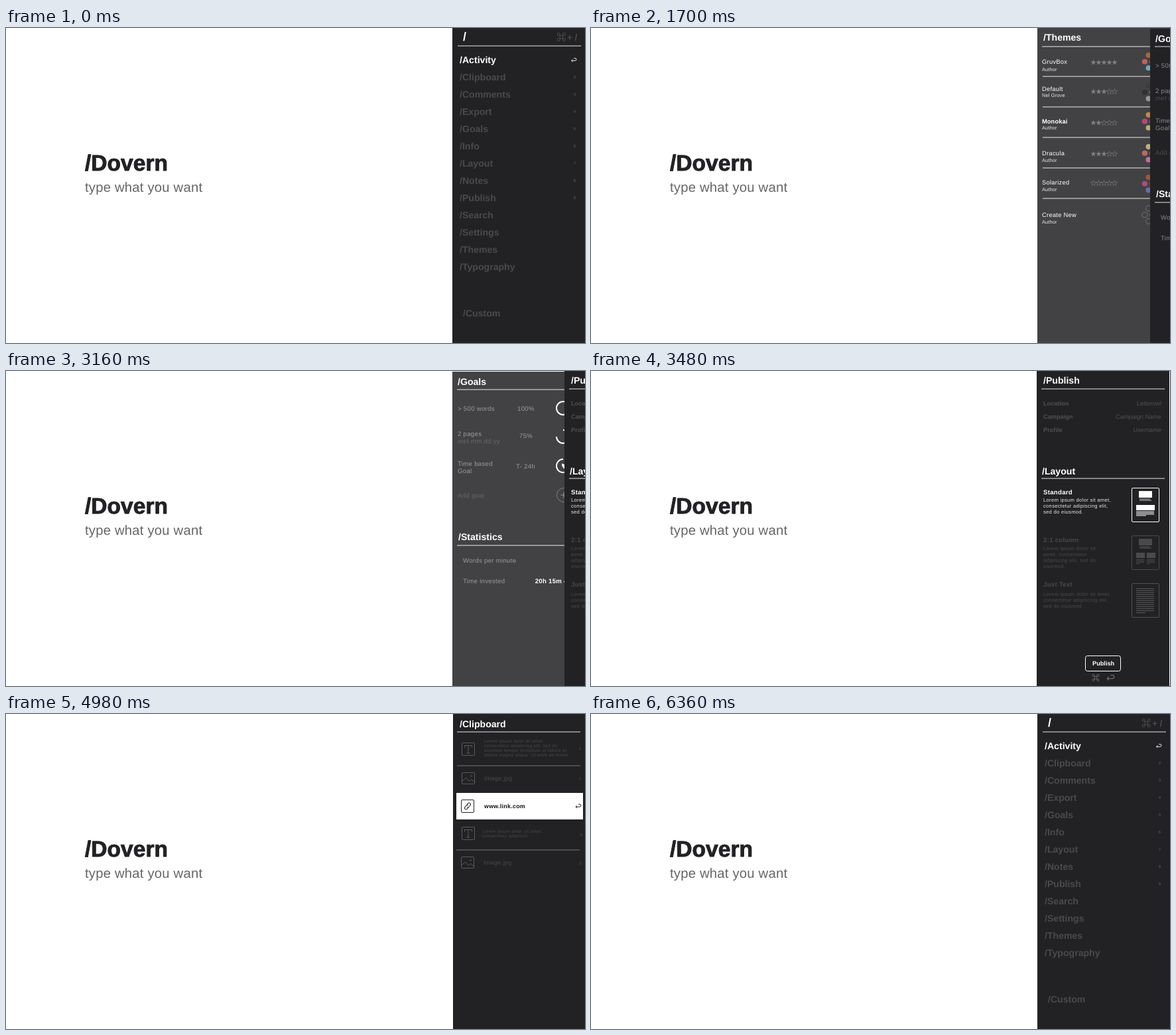
An HTML page for the animation above (6.86 s loop, 873 px wide and 475 px high).

```html
<!DOCTYPE html>
<html lang="en">
<head>
<meta charset="utf-8">
<title>Command panel</title>
<style>
html, body { margin: 0; width: 100%; height: 100%; overflow: hidden; background: #fff; }
svg { display: block; width: 873px; height: 475px; }
text {
  font-family: "Liberation Sans", Arial, Helvetica, sans-serif;
  white-space: pre;
  text-rendering: geometricPrecision;
}
</style>
</head>
<body>
<svg id="stage" viewBox="0 0 873 475" xmlns="http://www.w3.org/2000/svg"></svg>
<script>
const BG = '#222224', DIM = '#4a4a4c', MID = '#8a8a8c', RULE = '#a6a6a8', WHITE = '#fff';

// Markup helpers
const text = (x, y, s, size, fill, o = {}) =>
  `<text x="${x}" y="${y}" font-size="${size}" fill="${fill}" font-weight="${o.bold ? 700 : 400}"` +
  ` letter-spacing="${o.gap || 0}" text-anchor="${o.end ? 'end' : 'start'}">${s.replace('>', '&gt;')}</text>`;
const bold = (x, y, s, size, fill, o) => text(x, y, s, size, fill, { bold: true, ...o });
const head = (x, y, s, fill = WHITE) => bold(x, y, s, 14.1, fill);
const lines = (x, ys, rows, size, fill, gap) =>
  rows.map((s, i) => text(x, ys[i], s, size, fill, { gap })).join('');
const rect = (x, y, w, h, fill) => `<rect x="${x}" y="${y}" width="${w}" height="${h}" fill="${fill}"/>`;
const frame = (x, y, w, h, r, color) =>
  `<rect x="${x}" y="${y}" width="${w}" height="${h}" rx="${r}" fill="none" stroke="${color}"/>`;
const path = (d, color, w = 1, at = '') =>
  `<path d="${d}" fill="none" stroke="${color}" stroke-width="${w}" stroke-linejoin="round" transform="${at}"/>`;
const rule = (x, y, color = RULE, w = 1.7) => path(`M${x} ${y}h186`, color, w);
const back = (x, y = 0) => rect(x, y, 200, 475 - y, BG);

// Icons
const returnKey = (x, y, color, k = 1) =>
  path('M-4 1H2A2 2 0 0 0 2 -3H0M-2 -1L-4 1L-2 3', color, 1, `translate(${x} ${y}) scale(${k})`);
function commandKey(x, y, color, k) {
  const loop = [0, 90, 180, 270].map(a =>
    path('M-2 -2H-3.7A1.7 1.7 0 1 1 -2 -3.7Z', color, 1, `rotate(${a})`)).join('');
  return `<g transform="translate(${x} ${y}) scale(${k})">${path('M-2 -2H2V2H-2Z', color)}${loop}</g>`;
}
function star(x, y, full) {
  const pts = Array.from({ length: 10 }, (_, i) => {
    const r = i % 2 ? 1.7 : 4.4, a = i * Math.PI / 5;
    return `${(x + r * Math.sin(a)).toFixed(2)},${(y - r * Math.cos(a)).toFixed(2)}`;
  });
  return `<polygon points="${pts.join(' ')}" fill="${full ? '#6c6c6e' : 'none'}" stroke="#6c6c6e" stroke-width="${full ? 0 : .6}"/>`;
}
const stars = (y, n) => [0, 1, 2, 3, 4].map(i => star(757.5 + 8 * i, y, i < n)).join('');
const HEX = [[-6, -9.7], [5.6, -9.7], [-11.8, 0], [0, 0], [11.6, 0], [-6, 9.6], [5.6, 9.6]];
const dots = (y, colors) => HEX.map(([dx, dy], i) =>
  `<ellipse cx="${846.7 + dx}" cy="${y + dy}" rx="4.2" ry="4" ` +
  (colors ? `fill="${colors[i]}"/>` : 'fill="none" stroke="#59595b"/>')).join('');
const textIcon = (x, y) => frame(x, y, 19, 19, 1.5, '#5a5a5c') +
  path('M4 7V4H15V7M9.5 4V15.5M7 15.5H12', '#5a5a5c', 1, `translate(${x} ${y})`);
const imageIcon = (x, y) => frame(x, y, 19, 17, 1.5, '#5a5a5c') +
  path('M0 13L6 7.5L11 13L14 10L19 14M13 5a1 1 0 1 0 2 0a1 1 0 1 0 -2 0', '#5a5a5c', 1, `translate(${x} ${y})`);
const pin = (x, y) => path('M-4 -3L3 4M-1 -3L4 1M-2 2L2 -1', '#3c3c3e', 1, `translate(${x} ${y})`);

function menu() {
  const items = ['Activity', 'Clipboard', 'Comments', 'Export', 'Goals', 'Info', 'Layout',
    'Notes', 'Publish', 'Search', 'Settings', 'Themes', 'Typography'];
  return back(673) + bold(689, 19, '/', 18, WHITE) + commandKey(837.3, 13.5, DIM, 1.1) +
    bold(846, 19, '+', 14, DIM) + bold(857.5, 18.5, '/', 14, DIM) + rule(681, 27) +
    items.map((s, i) => head(684, 53 + 26 * i, '/' + s, i ? DIM : WHITE) +
      (i > 0 && i < 9 ? text(859, 76 + 26 * (i - 1), String(i + 1), 6, '#626264', { end: true }) : '')).join('') +
    returnKey(856.3, 48.3, WHITE, .92) + head(689, 435, '/Custom', DIM);
}

function themes() {
  const rows = [
    ['GruvBox', 54, 64.5, 52, 5, 50.7, '#93501f #a87b28 #b8443e #b5b0a6 #6d9a3c #5a98ad #1f70a5'],
    ['Default', 95, 104, 96, 3, 97, '#1b1b1d #38383a #0e0e0f #bababa #606062 #848486 #606062'],
    ['Monokai', 144, 153, 143, 2, 140.8, '#b8702c #8a63b5 #a82c58 #b5b5b0 #55a0b0 #a8a05a #7ea030'],
    ['Dracula', 192, 202, 190, 3, 188.8, '#a8a868 #58a0b0 #b05048 #b5b5b5 #40a860 #b85890 #55597a'],
    ['Solarized', 236, 245.5, 234, 0, 234.8, '#8c3a24 #7d5d18 #a02c62 #50707a #6d9a30 #4e5690 #2a7a7a'],
    ['Create New', 285, 294.5, 0, -1, 281.7, '']
  ];
  return back(673) + head(682, 19, '/Themes') + rule(680, 28) +
    [73, 119, 165, 211, 257].map(y => rule(681, y)).join('') +
    rows.map(([name, y, y2, sy, n, dy, colors], i) =>
      text(680, y, name, 9.3, WHITE, { gap: i === 2 ? .1 : .3, bold: i === 2 }) +
      text(680, y2, i === 1 ? 'Nel Grove' : 'Author', 7.5, '#e4e4e4', { gap: .1 }) +
      (n < 0 ? '' : stars(sy, n)) + dots(dy, colors && colors.split(' '))).join('');
}

function goals() {
  const t = (x, y, s, fill = MID) => text(x, y, s, 9.6, fill, { gap: .3 });
  const value = (y, s) => bold(858, y, s, 9.6, WHITE, { gap: .3, end: true });
  return back(673, 1) + head(681, 21, '/Goals') + rule(680, 28) +
    t(681, 60, '> 500 words') + t(771, 60, '100%') +
    t(681, 98, '2 pages') + t(681, 109, 'met mm.dd.yy', '#4c4c4e') + t(774, 101, '75%') +
    t(681, 143, 'Time based') + t(681, 154, 'Goal') + t(769, 147, 'T- 24h') +
    t(681, 191, 'Add goal', '#4c4c4e') +
    `<circle cx="840" cy="56" r="10" fill="none" stroke="#fff" stroke-width="2"/>` +
    path('M840 89A10 10 0 1 1 830 99', WHITE, 2) +
    path('M840 133A10 10 0 1 0 847 150.2', WHITE, 2) +
    `<path d="M838 139.5Q845 141 844.5 146.5Q842.5 148.5 840 146Q837.5 143 838 139.5Z" fill="#fff"/>` +
    `<circle cx="841" cy="187" r="10.5" fill="none" stroke="#6a6a6c"/>` +
    path('M836.5 187h9M841 182.5v9', '#8a8a8c') +
    pin(864, 57) + pin(863, 99) + pin(863, 139) +
    head(682, 255, '/Statistics') + rule(680, 263) +
    t(689, 289, 'Words per minute') + value(289, '80') +
    t(689, 320, 'Time invested') + value(320, '20h 15m 40s');
}

function publish() {
  const field = (y, a, b) => bold(682, y, a, 9.2, '#505052') + text(860, y, b, 9.2, '#505052', { end: true });
  const title = (y, s, fill) => bold(682, y, s, 9.6, fill, { gap: .3 });
  const lorem = ['Lorem ipsum dolor sit amet,', 'consectetur adipiscing elit,', 'sed do eiusmod.'];
  const card = (y, color) => frame(815.5, y + .5, 41, 51, 1.5, color);
  const top = (y, color, sub) => rect(826, y + 5, 20, 10, color) +
    rect(827, y + 16.5, 16, 1.4, sub) + rect(827, y + 18.5, 18, 1.4, sub);
  const column = x => rect(x, 274, 13, 8, DIM) +
    [0, 1, 2, 3].map(i => rect(x, 284 + 2 * i, i === 3 ? 5 : 12, 1, DIM)).join('');
  const page = Array.from({ length: 13 }, (_, i) => rect(822, 328 + 3 * i, i === 12 ? 14 : 27, 1, '#5a5a5c')).join('');
  return back(672) + head(682, 19, '/Publish') + rule(679, 27) +
    field(52, 'Location', 'Letterowl') + field(72, 'Campaign', 'Campaign Name') + field(92, 'Profile', 'Username') +
    head(680, 156, '/Layout') + rule(679, 162) +
    title(186, 'Standard', WHITE) + lines(682, [197, 206, 215], lorem, 7.6, '#e6e6e6', .3) +
    title(258, '2:1 column', DIM) +
    lines(682, [270, 279, 288, 297], ['Lorem ipsum dolor sit', 'amet, consectetur', 'adipiscing elit, sed do', 'eiusmod.'], 7.6, DIM, .3) +
    title(325, 'Just Text', DIM) + lines(682, [339, 348, 357], lorem, 7.6, DIM, .3) +
    card(176, WHITE) + top(176, WHITE, '#8e8e90') + rect(822, 202, 28, 8, WHITE) +
    rect(822, 211, 27, 6, '#8e8e90') + rect(822, 217, 15, 2, '#8e8e90') +
    card(248, DIM) + top(248, DIM, DIM) + column(822) + column(838) +
    card(320, '#505052') + page +
    frame(745.5, 429.5, 53, 23, 3, WHITE) + bold(756, 444, 'Publish', 9.2, WHITE) +
    commandKey(761, 462.5, '#6a6a6c', .95) + returnKey(783.5, 462.5, '#6a6a6c', 1.3);
}

function clipboard() {
  const num = (x, y, s) => text(x, y, s, 6.5, DIM, { end: true });
  const image = (x, y) => text(x, y, 'Image.jpg', 9, DIM, { gap: .3 });
  return back(674) + head(684, 20, '/Clipboard') + rule(680, 27) +
    textIcon(687.5, 43.5) + lines(721, [43, 50, 57, 64], ['Lorem ipsum dolor sit amet,',
      'consectetur adipiscing elit, sed do', 'eiusmod tempor incididunt ut labore et',
      'dolore magna aliqua. Ut enim ad minim'], 6.6, DIM, .33) + num(867, 54, '1') +
    rule(680, 78, '#5a5a5c') + imageIcon(687.5, 88.5) + image(721, 100) + num(867, 100, '2') +
    rect(679, 119, 191, 40, WHITE) + frame(686.5, 129.5, 19, 19, 1.5, BG) +
    path('M-1 2.2H-3.6A2.2 2.2 0 0 1 -3.6 -2.2H-.5A2.2 2.2 0 0 1 1.4 0M1 -2.2H3.6A2.2 2.2 0 0 1 3.6 2.2H.5A2.2 2.2 0 0 1 -1.4 0',
      BG, 1, 'translate(696 139) rotate(-50)') +
    bold(721, 142, 'www.link.com', 8.8, '#111', { gap: .3 }) + returnKey(863, 139, BG) +
    textIcon(687.5, 170.5) + lines(718, [179, 186], ['Lorem ipsum dolor sit amet,', 'consectetur adipiscin'], 6.6, DIM, .35) +
    num(869, 184, '4') + rule(679, 205, '#5a5a5c') +
    imageIcon(686.5, 215.5) + image(720, 227) + num(868, 227, '5');
}

const stage = document.getElementById('stage');
stage.innerHTML = rect(0, 0, 873, 475, WHITE) +
  `<g stroke="#222224" stroke-width=".9" stroke-linejoin="round">${bold(119, 215, '/Dovern', 33.6, BG)}</g>` +
  text(119, 247, 'type what you want', 20.3, '#666', { gap: .2 }) +
  [menu, themes, goals, publish, clipboard, menu].map(draw => `<g class="panel">${draw()}</g>`).join('');
const panels = [...stage.querySelectorAll('.panel')];

const LOOP = 6860, STEP = 20;
const moves = [[280, 580], [1700, 2020], [3160, 3480], [4640, 4980], [6140, 6360]];
const easeOut = u => 1 - .85 * (1 - u) ** 2;

function progress(i, t) {
  const [from, to] = moves[i];
  return t < from ? 0 : t >= to ? 1 : easeOut((t - from) / (to - from));
}

// Panels slide in while the old one fades; the last change is a dissolve.
function render(ms) {
  const t = Math.floor((ms % LOOP) / STEP) * STEP;
  const last = panels.length - 1;
  panels.forEach((panel, i) => {
    const enter = i ? progress(i - 1, t) : 1;
    const leave = i < last ? progress(i, t) : 0;
    const fade = i === last ? enter : i === last - 1 ? (leave < 1 ? 1 : 0) : 1 - leave;
    panel.style.display = enter > 0 && fade > 0 ? '' : 'none';
    panel.setAttribute('opacity', fade);
    panel.setAttribute('transform', `translate(${i === last ? 0 : Math.round(200 * (1 - enter))} 0)`);
  });
}

const start = performance.now();
function tick() {
  render(performance.now() - start);
  requestAnimationFrame(tick);
}
render(0);
requestAnimationFrame(tick);
</script>
</body>
</html>
```
